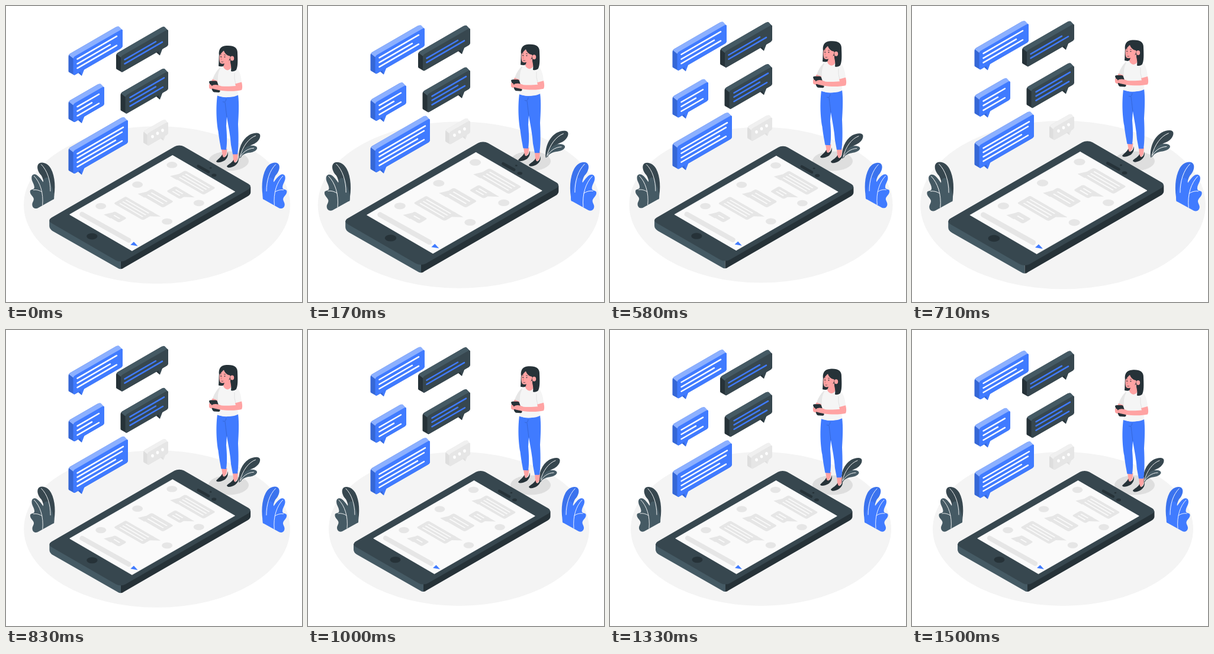
Write an HTML page that moves like this. It is 500 px wide and 500 px high and loops after 1540 ms.

```html
<!DOCTYPE html>
<html lang="en">
<head>
<meta charset="utf-8">
<title>Chat scene</title>
<style>
  html, body { margin: 0; width: 100%; height: 100%; overflow: hidden; background: #fff; }
  svg { display: block; width: 100vw; height: 100vh; --scale: 1; --lift: 0px; }
  .pulse { transform: scale(var(--scale)); }
  .float { transform: translateY(var(--lift)); }
  #floor { transform-origin: 255px 336px; }
  #device { transform-origin: 243px 340px; }
  #plants { transform-origin: 257.5px 278.5px; }
  .vein, .line { fill: none; stroke: #fff; stroke-linecap: round; }
  .vein { stroke-width: .9; }
  .line { stroke-width: 2.5; }
  .skin { fill: #ffa3a3; }
  .ink { fill: #263238; }
  .slate { fill: #37474f; }
  .steel { fill: #455a64; }
  .blue { fill: #407bff; }
  .grey { fill: #e6e6e6; }
</style>
</head>
<body>
<svg viewBox="0 0 500 500">
  <defs>
    <path id="backLeaf" d="M84 326C88 308 87 288 80 275C75 266 66 263 60.500 266C55 270 58 280 64 286C68 292 70 308 74 322Z"/>
    <path id="frontLeaf" d="M85 325L58 340C53 342 49 339 49 334C49 330 53 327 51 323C49 319 45 317 45.500 312C46 308 53 311 52.500 305C52 299 48 296 48 290C48 285 52 283 56 285C61 288 64 293 67 297C68 291 71 288 75 290C79 292 79 298 81 303C84 311 86 317 85 325Z"/>
    <path id="veins" class="vein" d="M64 268C74 278 79 294 79 312M52 287C62 297 68 315 66 335M51 310C56 309 62 311 65 313.500"/>
  </defs>

  <ellipse id="floor" class="pulse" cx="255" cy="336" rx="220" ry="130" fill="#f4f4f4"/>
  <ellipse cx="376" cy="262" rx="34" ry="16.5" fill="#dedede"/>

  <g id="device" class="pulse">
    <path class="steel" d="M77 361v10q0 5 6 8.500L190 440.500q2 1.500 5 1.500V428Z"/>
    <path class="ink" d="M409.500 306v9q0 4-5 7L200 440q-2 2-5 2V428Z"/>
    <rect class="slate" width="252.8" height="141" rx="9" transform="matrix(.866 -.5 -.866 -.5 194.8 432.200)"/>
    <path d="M280.500 254.500L383.300 314.200L213.500 411.800L110.800 352Z" fill="#fafafa" stroke="#fafafa" stroke-linejoin="round"/>
    <ellipse class="ink" cx="147.500" cy="388" rx="9" ry="5.200"/>
    <path d="M323 272l17 9.500" stroke="#263238" stroke-width="4.500" stroke-linecap="round"/>
    <ellipse class="ink" cx="349" cy="287" rx="4" ry="2.500"/>
    <ellipse class="ink" cx="343.500" cy="275" rx="1.800" ry="1.200"/>
    <path d="M131 351.500L208 394.500" stroke="#e6e6e6" stroke-width="8" stroke-linecap="round"/>
    <path class="blue" d="M211 402l5.500-5 6.500 7Z"/>
    <g id="chats" class="grey"></g>
  </g>

  <g id="plants" class="pulse">
    <use href="#backLeaf" class="slate"/>
    <use href="#frontLeaf" class="steel"/>
    <use href="#veins"/>
    <g transform="matrix(-1 0 0 1 515 0)">
      <use href="#backLeaf" fill="#3b73ee"/>
      <use href="#frontLeaf" class="blue"/>
      <use href="#veins"/>
    </g>
    <path class="slate" d="M390.500 258C389 243 395 227 407 219.500C415 215 425 214.500 425.500 220C426 226 420 232 414 234.500C405 238 398 245 394 256Z"/>
    <path class="steel" d="M391 258C394 248 399 239 408 237C414 236 421 237 420.500 241.500C419 246 412 248 407 248.500C400 249.500 395 253 391 258Z"/>
    <path class="vein" d="M418 220.500C406 225 397 238 392.500 254M415 241C404 241.500 397 248 392 256"/>
  </g>

  <g id="person" class="float">
    <path class="skin" d="M364 242h9.500l-1 9-6 8-4-2 3-6ZM383 249h9l-1 11-6 8-4-2 3-6Z"/>
    <path class="ink" d="M355 263C358 259 363 256 365.500 251Q366 257 369 256Q374 254 374.500 247C376 254 373 258 370 261C364 265 356 266 355 263ZM373 271C377 267 382 265 384.500 260Q385 266 388 265Q392 263 392.500 256C394 263 391 267 387 270C381 274 374 275 373 271Z"/>
    <path class="blue" d="M357 151C354 175 356 200 358.500 212C360 225 362 235 363.500 243L372 243.500C374 230 373 215 372 203L373 188C376 205 379 220 380 235L383 251L391 251C393 240 393 220 392 200C393 185 394 165 392 150C380 156 365 156 357 151Z"/>
    <path d="M373 188L370 163M366 162Q371 165 372 157" fill="none" stroke="#3363cc" stroke-width=".8"/>
    <path class="ink" d="M361 77C359 84 360 94 359 102Q365 104 372 101L384 88Z"/>
    <path d="M362 104C355 110 351 118 348 127L357 130L364 118Z" fill="#e6e6e6"/>
    <path d="M367 102C361 105 359 111 358 119L357 152C366 155.500 384 155.500 392 151L391 132L398 129C397 117 394 108 388 104L381 102Z" fill="#f5f5f5"/>
    <path d="M386 114Q385 124 388 132" fill="none" stroke="#dcdcdc" stroke-width=".8"/>
    <path class="skin" d="M370 95L367 103Q369 108 374 109Q380 108 381 102L381 91Z"/>
    <path class="ink" d="M379 80L391 80C391.500 92 392 104 388.500 109Q384 112 380 110.500Q381 104 379 96Z"/>
    <path class="skin" d="M362 79C360 84 360 92 361.500 96C363 99 368 98.500 371 97C376 95 379 90 379 84L371 75Z"/>
    <path class="ink" d="M360 84C358.500 75 362 68 372 67.500C385 66.500 391 71 391 79V87L384 92L378 85C373 84 370 81 368 76C364 79 363 82 360 84Z"/>
    <ellipse class="skin" cx="382" cy="89" rx="3.200" ry="4"/>
    <path d="M362 83l2-.8M368 83l3 .5M363.500 94.500q2 1 3.500 0" fill="none" stroke="#263238" stroke-width=".7"/>
    <path d="M364.500 87l-1.500 4h2" fill="none" stroke="#e57f7f" stroke-width=".8"/>
    <circle class="ink" cx="363.200" cy="86.200" r=".9"/>
    <circle class="ink" cx="369.500" cy="86.500" r=".9"/>
    <path class="skin" d="M349 124L357 127L356 136L347 141Q342 140 343 134Z"/>
    <path class="ink" d="M343 129q0-2 3-2h8q2 0 3 2l4.500 14q.5 3-2 3.500L351 146q-2-1-3-4Z"/>
    <path class="skin" d="M343 133q3-1 4 1.500l3 5q-5 3-7-1Z"/>
    <path class="skin" d="M387 132L398 129C399 133 400 139 398 142.500C388 145 372 144.500 361 143L352 141C347 140 346 136 350 134Q356 132 364 136C373 136.500 383 136 388 135.500Z"/>
  </g>

  <g id="bubbles" class="float"></g>
</svg>
<script>
const svg = document.querySelector('svg');
const palettes = {
  blue: { front: '#407bff', top: '#8cb0ff', side: '#3567d6', line: '#fff' },
  dark: { front: '#37474f', top: '#455a64', side: '#263238', line: '#407bff' },
  grey: { front: '#e6e6e6', top: '#f0f0f0', side: '#dedede', line: '#fff' },
};

// Upright isometric slab; (x, y) is the top left corner of its front face.
// Each line is [y at its start, x at its end], relative to the page.
function bubble({ x, y, w, h, color, tail, lineX, lines = [], dots = [] }) {
  const c = palettes[color], r = 3.5, d = color === 'grey' ? 6.5 : 8, k = d * 1.15;
  const hull = `M${r - d} ${r - k}H${w - r - d}L${w - r} ${r}V${h - r}H${r}L${r - d} ${h - r - k}Z`;
  const top = `M${1 - d} ${1.5 - k}Q${1 - d} ${-k} ${4 - d} ${-k}H${w - d - 3}` +
    `Q${w - d} ${-k} ${w - d + 2} ${2 - k}L${w - 1} 1L0 2Z`;
  const [tx, ty] = tail;
  return `<path d="M${tx} ${ty}l7 6 5-13Z" fill="${c.front}"/>
    <path d="M${tx} ${ty}l7 6-3-8Z" fill="${c.side}"/>
    <g transform="matrix(1 -.577 0 1 ${x} ${y})">
      <path d="${hull}" fill="${c.side}" stroke="${c.side}" stroke-width="${2 * r}" stroke-linejoin="round"/>
      <path d="${top}" fill="${c.top}"/>
      <rect width="${w}" height="${h}" rx="${r}" fill="${c.front}"/>
    </g>` +
    lines.map(([ly, end]) => `<path class="line" style="stroke:${c.line}"
      d="M${lineX} ${ly}L${end} ${ly - (end - lineX) * .577}"/>`).join('') +
    dots.map(([cx, cy]) => `<ellipse cx="${cx}" cy="${cy}" rx="2.3" ry="2.8" fill="#fff"/>`).join('');
}

document.querySelector('#bubbles').innerHTML = [
  { x: 113.5, y: 87, w: 83.5, h: 31.5, color: 'blue', tail: [121, 112.5], lineX: 120.5,
    lines: [[90, 187], [98, 176], [105.5, 187]] },
  { x: 194, y: 85.5, w: 80, h: 28, color: 'dark', tail: [253, 78], lineX: 200.5,
    lines: [[91, 253], [98, 264]] },
  { x: 113.5, y: 166, w: 52.5, h: 32, color: 'blue', tail: [121, 192.5], lineX: 120.5,
    lines: [[170.5, 157], [178, 145], [186, 157]] },
  { x: 201.5, y: 152, w: 72.5, h: 31.5, color: 'dark', tail: [253, 152.5], lineX: 209.5,
    lines: [[155, 267], [162, 253], [169.5, 265]] },
  { x: 113.5, y: 245.5, w: 92.5, h: 39.5, color: 'blue', tail: [121, 279.5], lineX: 120.5,
    lines: [[250, 198], [257, 196], [264.5, 185], [272, 196]] },
  { x: 238.5, y: 216, w: 35.5, h: 21.5, color: 'grey', tail: [259, 222],
    dots: [[247.5, 221], [256, 215.5], [264.5, 210.5]] },
].map(bubble).join('');

// Flat message on the screen; (x, y) is its far corner.
function message([x, y, w, h, lines, side]) {
  const tail = side === 'left' ? `M0 ${h - 11}L-5 ${h + 1}H8Z` : `M${w - 6} 0H${w + 11}L${w} 10Z`;
  const gap = h / (lines + 1);
  let stripes = '';
  for (let i = 1; i <= lines; i++) stripes += `M6 ${i * gap}H${w - 6}`;
  return `<g transform="matrix(.866 .5 -.866 .5 ${x} ${y})">
    <path d="${tail}"/><rect width="${w}" height="${h}" rx="3"/>
    <path d="${stripes}" stroke="#fafafa" stroke-width="2"/></g>`;
}

document.querySelector('#chats').innerHTML =
  [[279.5, 270], [222.5, 302.5], [162, 338], [324, 333], [271.5, 363.5]]
    .map(([x, y]) => `<ellipse cx="${x}" cy="${y}" rx="8.8" ry="5.2"/>`).join('') +
  [
    [301.5, 279, 58, 23, 3, 'left'],
    [246, 309.5, 42, 20.5, 2, 'left'],
    [285, 305, 26, 17, 2, 'right'],
    [203, 322, 56, 23, 3, 'right'],
    [185, 346.5, 23, 15, 1, 'left'],
  ].map(message).join('');

const LOOP = 1540, PERIOD = 1500, STEP = 1000 / 24, LEAD = 34;
const beat = [[0, 1], [.1, 1.1], [.3, 1], [.4, 1], [.5, 1.1], [.6, 1], [1, 1]];

function interpolate(keys, p) {
  const i = Math.max(1, keys.findIndex(([at]) => at >= p));
  const [a, from] = keys[i - 1], [b, to] = keys[i];
  return from + (to - from) * (p - a) / (b - a);
}

function draw(now) {
  // 24 pictures per second; the small lead rounds to centisecond delays.
  const t = Math.floor((now % LOOP + 4) / STEP) * STEP;
  const p = Math.min(1, (t + LEAD) / PERIOD);
  svg.style.setProperty('--scale', interpolate(beat, p));
  svg.style.setProperty('--lift', `${-10 * (1 - Math.abs(2 * p - 1))}px`);
}

const start = performance.now();
function tick() {
  draw(performance.now() - start);
  requestAnimationFrame(tick);
}
tick();
</script>
</body>
</html>
```
